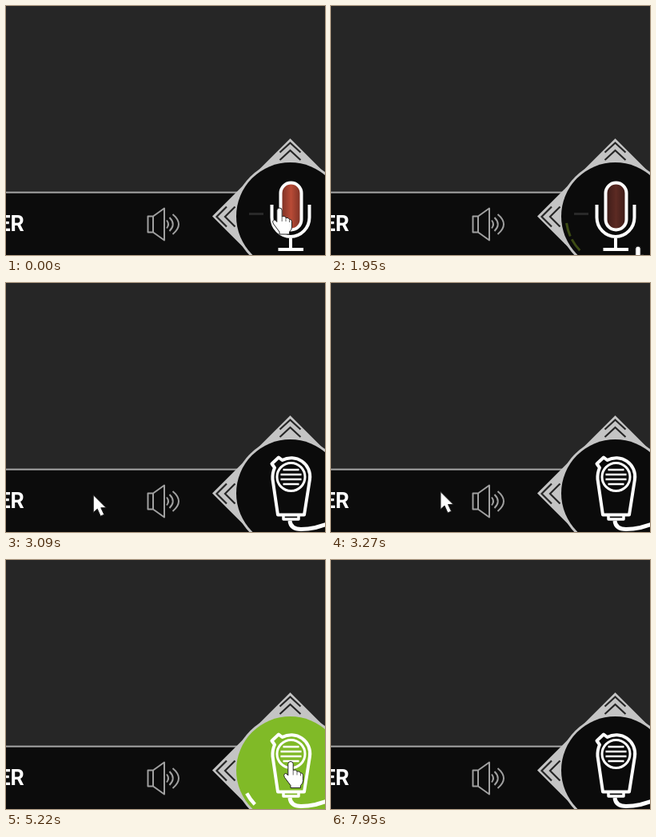
Write an HTML page that moves like this. It is 399 by 312 pixels and loops after 8.55 s.

```html
<!DOCTYPE html>
<html lang="en">
<head>
<meta charset="utf-8">
<title>Push to talk</title>
<style>
  html, body { margin: 0; width: 100%; height: 100%; overflow: hidden; background: #262626; }
  svg { display: block; width: 399px; height: 312px; }
  .line { fill: none; stroke-linejoin: round; }
  .icon { stroke: #fff; stroke-width: 4; }
  .chevron { stroke: #262626; stroke-width: 2.2; stroke-linejoin: miter; }
  .speaker { stroke: #a0a0a0; stroke-width: 2; }
  .cursor { fill: #fff; stroke: #222; stroke-width: 1; stroke-linejoin: round; }
  text { font: 700 27px Roboto, Arial, sans-serif; fill: #fff; }
</style>
</head>
<body>
<svg viewBox="0 0 399 312">
  <defs>
    <linearGradient id="glow">
      <stop offset="0" stop-color="#7a3024"/>
      <stop offset=".5" stop-color="#b84b36"/>
      <stop offset="1" stop-color="#7a3024"/>
    </linearGradient>
    <linearGradient id="dim">
      <stop offset="0" stop-color="#3c1c18"/>
      <stop offset=".5" stop-color="#5c2a23"/>
      <stop offset="1" stop-color="#3c1c18"/>
    </linearGradient>
  </defs>

  <rect width="399" height="312" fill="#262626"/>
  <rect y="234" width="399" height="78" fill="#0c0c0c"/>
  <rect y="232.600" width="300" height="2" fill="#a8a8a8"/>
  <text x="22.800" y="282.300" text-anchor="end">ER</text>

  <g class="line speaker">
    <path d="M184 263.500H177.500V283.500H184ZM184 263.500L198 253.500V293.500L184 283.500"/>
    <path d="M201 268.500Q205 273.500 201 278.500M204.500 265Q213 273.500 204.500 282M208.500 261Q223.500 273.500 208.500 286"/>
  </g>

  <path d="M258 263.500L355.500 166L453 263.500L355.500 361Z" fill="#c4c4c4"/>
  <circle cx="355.500" cy="263.500" r="70.500" fill="#c4c4c4"/>
  <path class="line chevron" d="M342.500 183.500L355.500 171.500L368.500 183.500M342.500 193L355.500 181L368.500 193"/>
  <path class="line chevron" d="M276 251.500L263.500 264L276 276.500M286.500 251.500L274 264L286.500 276.500"/>
  <circle id="button" cx="355.500" cy="263.500" r="67.500"/>
  <g id="meter" class="line"></g>

  <g id="mic">
    <path d="M304 260.500H322" stroke="#292929" stroke-width="3"/>
    <rect x="344" y="222" width="25" height="58" rx="12.500" fill="url(#dim)"/>
    <rect id="lit" x="344" y="222" width="25" height="58" rx="12.500" fill="url(#glow)"/>
    <g class="line icon">
      <rect x="343.500" y="221.500" width="26" height="59" rx="13"/>
      <path d="M332.500 249V265A23.500 24 0 0 0 379.500 265V249M356 289V305M340.500 305H372"/>
    </g>
  </g>

  <g id="radio" class="line icon">
    <path d="M340 290.500L333.500 246Q333 238 336 231.500L332.500 226.500L341 218.500L345.500 222A23.500 23.500 0 0 1 380 246L373 290.500Z"/>
    <circle cx="356.500" cy="243" r="17.500" stroke-width="3"/>
    <path d="M346.500 234H366.500M343.500 240H369.500M343.500 246H369.500M346.500 252H366.500" stroke-width="2.600"/>
    <path d="M347 291V296H366V291" stroke-width="3.500"/>
    <path d="M355 298Q356 308.500 369 308.500Q378 308.500 387 306.500L402 302" stroke-width="5"/>
  </g>

  <g id="hand" class="cursor">
    <path d="M-3.200 4Q-3 1 0 1Q3.200 1 3.200 4V12Q7 10.500 8 13.500Q11.500 12.500 12.500 15.500Q15.500 15 15.500 19V25Q15.500 28.500 12.500 31V34H0V31L-7.500 21Q-9.500 17 -6.500 16Q-5 15.500 -3.200 18.500Z"/>
    <path d="M3.200 12V18M8 13.500V18M12.500 15.500V19" fill="none" stroke="#666"/>
  </g>
  <path id="arrow" class="cursor" d="M0 0V22L5 17.500L9 26.500L13.500 24.500L9.500 16H16Z"/>
</svg>

<script>
  const LOOP = 8550, STEP = 30;
  const CX = 355.5, CY = 263.5, METER_R = 61.5;
  const $ = id => document.getElementById(id);

  const ease = {
    both: u => u * u * (3 - 2 * u),
    in: u => u ** 1.6,
    out: u => 1 - (1 - u) ** 2,
    none: u => u,
    hold: () => 0
  };

  // Each key: time, values, easing towards the next key.
  const pointer = [
    [30, [342, 252]], [150, [347, 257]],
    [780, [347, 257]], [1140, [384, 305]],
    [1920, [384, 305], 'none'], [1950, [384, 300]],
    [2520, [354, 262], 'hold'],
    [2850, [-14, 284], 'out'], [3270, [137, 261.5]],
    [3900, [137, 261.5], 'in'], [4050, [414, 260]],
    [4260, [414, 258], 'out'], [4590, [356, 251.5]],
    [7530, [356, 251.5], 'in'], [7950, [32, -32]]
  ];
  const glow = [
    [30, [1]], [150, [.93]], [780, [.93]], [1020, [0]],
    [2070, [0]], [2370, [1]]
  ];

  function at(keys, t) {
    if (t <= keys[0][0]) return keys[0][1];
    const i = keys.findIndex(k => k[0] > t);
    if (i < 0) return keys[keys.length - 1][1];
    const [t0, a, kind = 'both'] = keys[i - 1], [t1, b] = keys[i];
    const u = ease[kind]((t - t0) / (t1 - t0));
    return a.map((v, n) => v + (b[n] - v) * u);
  }

  // Level marks run clockwise from the lower left.
  const marks = [-36, -16, 4, 24, 44].map(deg => {
    const point = d => {
      const a = (deg + d) * Math.PI / 180;
      return `${CX - METER_R * Math.cos(a)} ${CY - METER_R * Math.sin(a)}`;
    };
    const mark = document.createElementNS('http://www.w3.org/2000/svg', 'path');
    mark.setAttribute('d', `M${point(-8)}A${METER_R} ${METER_R} 0 0 1 ${point(8)}`);
    return $('meter').appendChild(mark);
  });

  const levels = [
    [0, 0], [1500, 2], [2100, 3], [2340, 4], [2700, 3], [2850, 0],
    [5220, 1], [5790, 4], [6120, 5], [6570, 0]
  ];
  const show = (el, on) => el.setAttribute('visibility', on ? 'visible' : 'hidden');

  function render(t) {
    const radio = t >= 2850;
    const pressed = t >= 4770 && t < 6570;
    show($('mic'), !radio);
    show($('radio'), radio);
    $('lit').setAttribute('opacity', radio ? 0 : at(glow, t)[0]);
    $('button').setAttribute('fill', !pressed ? '#0b0b0b' : t < 4800 ? '#69991f' : '#80ba27');

    const level = levels.filter(k => k[0] <= t).pop()[1];
    marks.forEach((mark, i) => show(mark, i < level));
    $('meter').setAttribute('stroke', radio ? '#fff' : '#3d4c14');
    $('meter').setAttribute('stroke-width', radio ? 4.5 : 3);

    const [x, y] = at(pointer, t);
    const over = Math.abs(x - CX) + Math.abs(y - CY) < 98;
    for (const id of ['hand', 'arrow']) {
      $(id).setAttribute('transform', `translate(${x} ${y})`);
      show($(id), (id === 'hand') === over);
    }
  }

  const start = performance.now();
  function tick() {
    const t = (performance.now() - start) % LOOP;
    render(Math.floor(t / STEP) * STEP);
    requestAnimationFrame(tick);
  }
  tick();
</script>
</body>
</html>
```
